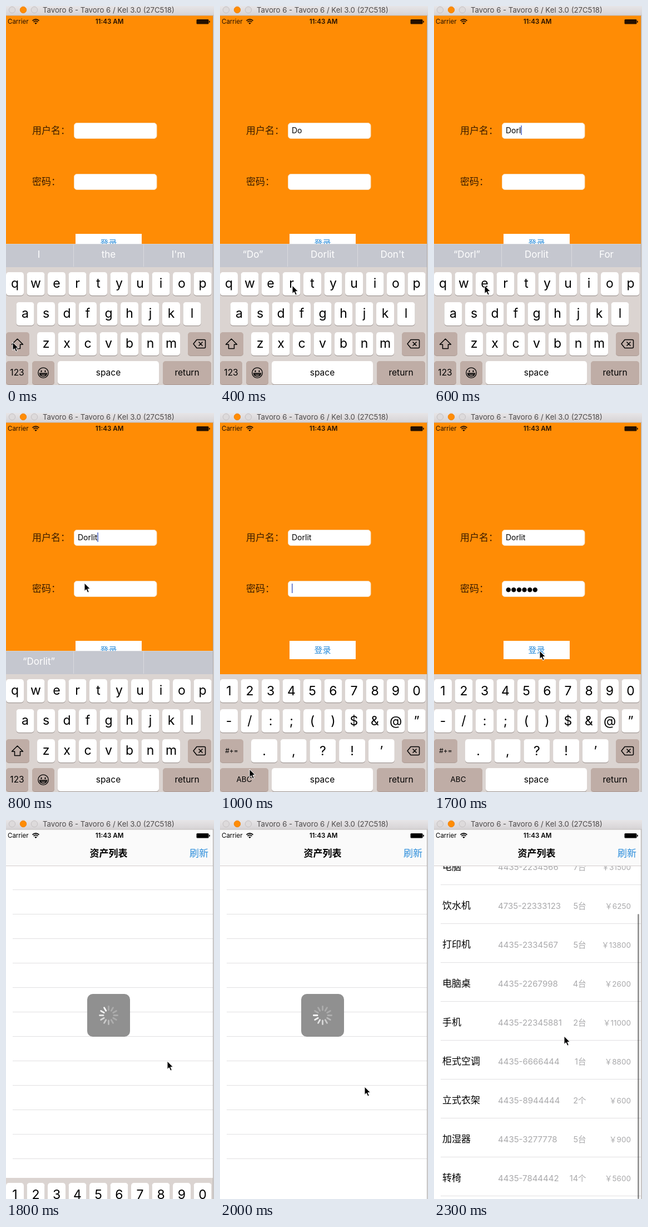
An HTML page for the animation above (2400 ms loop, 374 by 682 pixels).

```html
<!DOCTYPE html>
<html lang="zh-CN">
<head>
<meta charset="utf-8">
<style>
  html, body { margin: 0; width: 100%; height: 100%; overflow: hidden; background: #fff; }
  svg { display: block; width: 374px; height: 682px; }
  text { font-family: Inter, "Noto Sans CJK SC", "Noto Sans CJK", sans-serif; white-space: pre; }
  #dots { font-family: "DejaVu Sans", sans-serif; font-size: 11px; }
</style>
</head>
<body>
<svg id="stage" viewBox="0 0 374 682" xmlns="http://www.w3.org/2000/svg"></svg>
<script>
const STEP = 100, STEPS = 24;
const USER = "Dorlit", PIN = "123456";
const BLUE = "#2b8ddb", LINE = "#e1e0e2", FAINT = "#a9a9ab";

const rect = (x, y, w, h, fill, rx = 0, extra = "") =>
  `<rect x="${x}" y="${y}" width="${w}" height="${h}" fill="${fill}" rx="${rx}" ${extra}/>`;
const text = (x, y, size, str, fill = "#000", anchor = "start", extra = "") =>
  `<text x="${x}" y="${y}" font-size="${size}" fill="${fill}" text-anchor="${anchor}" ${extra}>${str.replace(/&/g, "&amp;")}</text>`;
const range = n => [...Array(n).keys()];

// Keyboard
const key = (x, y, w, label, size = 23, dark = false) =>
  rect(x, y + 1, w, 42, dark ? "#ac9b95" : "#948b88", 5) +
  rect(x, y, w, 42, dark ? "#bfada6" : "#fff", 5) +
  text(x + w / 2, y + 21 + size * (/[a-z]/.test(label) && size > 20 ? 0.29 : 0.33), size, label, "#000", "middle");
const keyRow = (chars, x, y, w = 32, step = 37.5) =>
  [...chars].map((c, i) => key(x + i * step, y, w, c)).join("");

const deleteKey = key(327, 587, 42, "", 16, true) +
  `<path d="M337 608l6-7.5h13.5q2 0 2 2v11q0 2-2 2H343zM346.5 604.5l7 7m0-7l-7 7" fill="none" stroke="#000" stroke-width="1.5" stroke-linejoin="round"/>`;
const spaceAndReturn = key(93, 639, 182, "space", 15.5) + key(282, 639, 87, "return", 15.5, true);
const shiftIcon = `<path d="M20.5 599l10 10h-5v7.5h-10V609h-5z" fill="none" stroke="#000" stroke-width="1.5" stroke-linejoin="round"/>`;
const smiley = `<g fill="none" stroke="#000" stroke-width="1.3"><circle cx="67" cy="660" r="9.2"/>
  <path d="M60.5 661h13q-1 5-6.500 5t-6.500-5zM61 663h12"/>
  <path d="M63.5 656.5v1.500M70.5 656.5v1.500" stroke-width="2" stroke-linecap="round"/></g>`;

const letters = keyRow("qwertyuiop", 0, 479) + keyRow("asdfghjkl", 18.5, 533) +
  key(0, 587, 42, "", 16, true) + shiftIcon + keyRow("zxcvbnm", 56, 587) + deleteKey +
  key(0, 639, 40, "123", 15.5, true) + key(47, 639, 40, "", 16, true) + smiley + spaceAndReturn;
const numbers = keyRow("1234567890", 0, 479) + keyRow("-/:;()$&@”", 0, 533) +
  key(0, 587, 42, "#+=", 12, true) + keyRow(".,?!’", 56, 587, 47, 52.7) + deleteKey +
  key(0, 639, 87, "ABC", 13.5, true) + spaceAndReturn;

const suggestionBar = rect(0, 428, 372, 42, "#c5c7cf") + rect(0, 428, 372, 1, "#d3d4d9") +
  [121, 247].map(x => rect(x, 429, 1, 40, "#d9d9dd")).join("") +
  [59, 184.5, 310].map(x => text(x, 452.5, 17, "", "#fff", "middle", 'class="suggestion"')).join("");

// Screens
const field = (y, label) => text(47, y + 19.5, 17, label, "#3a1c00") +
  rect(122.5, y + 0.5, 148.5, 28, "#fff", 5, 'stroke="#f6dcbb"');
const login = rect(0, 17, 372, 665, "#ff8c05") + field(210, "用户名：") + field(302, "密码：") +
  text(129, 228.5, 14, "", "#000", "start", 'id="user"') +
  `<text id="pin" x="129" y="321" font-size="14"><tspan id="dots"></tspan><tspan id="digit"></tspan></text>` +
  rect(0, 0, 1.5, 17, "#4b63c4", 0, 'id="caret"') +
  rect(125, 410, 119, 33, "#fff") + text(184.5, 432, 15, "登录", BLUE, "middle");

const items = [
  ["投影仪", "4435-2234111", "3台", 9800],
  ["电脑", "4435-2234566", "7台", 31500],
  ["饮水机", "4735-22333123", "5台", 6250],
  ["打印机", "4435-2334567", "5台", 13800],
  ["电脑桌", "4435-2267998", "4台", 2600],
  ["手机", "4435-22345881", "2台", 11000],
  ["柜式空调", "4435-6666444", "1台", 8800],
  ["立式衣架", "4435-8944444", "2个", 600],
  ["加湿器", "4435-3277778", "5台", 900],
  ["转椅", "4435-7844442", "14个", 5600]
];
const itemRow = ([name, code, count, price], i) => {
  const y = 82 + i * 70;
  return text(15, y + 44, 17, name) + text(115, y + 43.5, 15, code, FAINT) +
    text(273.5, y + 43.5, 14.5, count, FAINT, "end") +
    text(354, y + 44, 13.5, "￥" + price, FAINT, "end") + rect(12, y + 70, 360, 1, LINE);
};
const emptyRows = range(12).map(i => rect(12, 125 + i * 44, 360, 1, LINE)).join("");
const spokes = range(12).map(i =>
  `<path d="M0-9.5V-16" transform="rotate(${i * 30 - 30})" stroke="#fff" stroke-width="2.8" stroke-linecap="round" opacity="${Math.max(0.25, 1 - (12 - i) % 12 * 0.12)}"/>`).join("");
const hud = rect(146, 313, 77, 77, "#8c8c8c", 10, 'opacity=".96"') +
  `<g transform="translate(184.5 351.5)"><g id="spinner">${spokes}</g></g>`;
const navBar = rect(0, 17, 372, 65, "#fafafa") + rect(0, 82, 372, 1, "#d3cdcd") +
  text(184.5, 66, 17, "资产列表", "#000", "middle", 'font-weight="600"') +
  text(364, 66, 17, "刷新", BLUE, "end");
const list = rect(0, 17, 372, 665, "#fff") + `<g id="empty">${emptyRows}</g>` +
  `<g id="items">${items.map(itemRow).join("")}</g>` + navBar +
  `<g id="hud">${hud}</g>` + rect(366, 169, 3, 513, "#000", 1.5, 'id="thumb" opacity=".4"');

// Window chrome and status bar
const statusBar = `<g id="status">` + text(3, 32, 11.5, "Carrier", "currentColor") +
  text(186, 32, 11.6, "11:43 AM", "currentColor", "middle", 'font-weight="600"') +
  `<g fill="none" stroke="currentColor" stroke-width="1.7"><path d="M47.5 26.5q6-5 12 0M49.5 28.8q4-3.3 8 0"/></g>
  <path d="M51.2 30.5q2.3-1.7 4.6 0l-2.3 2.5z" fill="currentColor"/>
  <rect x="342.5" y="24" width="22" height="8.5" rx="1.5" fill="currentColor"/>
  <rect x="365" y="26.5" width="1.7" height="3.5" rx=".8" fill="currentColor"/></g>`;
const titleBar = `<defs><linearGradient id="chrome" x2="0" y2="1"><stop stop-color="#e7e5e7"/><stop offset="1" stop-color="#d6d3d5"/></linearGradient></defs>` +
  rect(0, 0, 374, 17, "url(#chrome)") + rect(0, 16.5, 374, 1, "#c2bdbd") +
  [11, 31, 51].map((x, i) => `<circle cx="${x}" cy="7" r="5.7" fill="${i === 1 ? "#ff8c05" : "#dddadb"}" stroke="${i === 1 ? "#ee8410" : "#c5c1c3"}"/>`).join("") +
  text(66, 12, 13.2, "Tavoro 6 - Tavoro 6 / Kel 3.0 (27C518)", "#4c4a4b");
const pointer = `<path id="pointer" d="M0 0V14.5L3.3 11.5L5.8 17.2L8.3 16.1L5.9 10.6H10.4Z" fill="#000" stroke="#fff"/>`;

document.getElementById("stage").innerHTML = `<g id="login">${login}</g><g id="list">${list}</g>
  <g id="keyboard"><g id="bar">${suggestionBar}</g>${rect(0, 470, 372, 212, "#dbd4d1")}
  <g id="letters">${letters}</g><g id="numbers">${numbers}</g></g>
  ${statusBar}${titleBar}${rect(372, 17, 1, 665, "#aaa7a7")}${rect(373, 17, 1, 665, "#e4e2e2")}${pointer}`;

const $ = id => document.getElementById(id);
const show = (id, on) => $(id).setAttribute("display", on ? "inline" : "none");
const move = (id, x, y) => $(id).setAttribute("transform", `translate(${x} ${y})`);
const suggestionTexts = [...document.querySelectorAll(".suggestion")];

const userLengths = [0, 0, 1, 1, 2, 3, 4, 6];
const pinLengths = [1, 2, 4, 5, 6];
const pointerPath = [
  [12, 605], [34, 555], [150, 530], [278, 503], [130, 503], [146, 552], [91, 503], [278, 503],
  [141, 306], [24, 655], [53, 641], [15, 503], [60, 500], [125, 500], [191, 498], [200, 500],
  [192, 460], [190, 428], [290, 434], [290, 440], [260, 480], [236, 496], [235, 442], [234, 389]
];

function suggestions(word) {
  if (!word) return ["I", "the", "I'm"];
  const quoted = `“${word}”`;
  if (word === USER) return [quoted, "", ""];
  return [quoted, USER, word.length > 2 ? "For" : "Don't"];
}

function render(time) {
  const k = Math.floor(time / STEP) % STEPS;
  const onLogin = k < 18, onUser = k < 9, loaded = k >= 21;

  // Typed text; the newest password digit stays readable for a moment
  const word = USER.slice(0, userLengths[Math.min(k, 7)]);
  const digits = k < 11 ? 0 : pinLengths[Math.min(k - 11, 4)];
  const masked = k > 15 ? digits : Math.max(0, digits - 1);
  $("user").textContent = word;
  $("dots").textContent = "●".repeat(masked);
  $("digit").textContent = PIN.slice(masked, digits);

  show("login", onLogin);
  show("list", !onLogin);
  $("status").style.color = onLogin ? "#241000" : "#000";

  show("caret", k > 5 && k % 2 === 0);
  if (onLogin) {
    const active = $(onUser ? "user" : "pin");
    move("caret", 129 + active.getComputedTextLength(), onUser ? 215 : 307);
  }

  show("keyboard", k < 19);
  show("bar", onUser);
  show("letters", k < 10);
  show("numbers", k >= 10);
  move("keyboard", 0, k === 18 ? 174 : 0);
  suggestions(word).forEach((s, i) => suggestionTexts[i].textContent = s);

  show("empty", !loaded);
  show("hud", !loaded);
  show("items", loaded);
  show("thumb", k > 21);
  const scroll = Math.max(0, k - 21) * 53;
  move("items", 0, -scroll);
  $("thumb").setAttribute("y", 82 + scroll * 0.82);
  $("spinner").setAttribute("transform", `rotate(${(k - 18) * 150})`);

  move("pointer", ...pointerPath[k]);
}

const start = performance.now();
function tick() {
  render(performance.now() - start);
  requestAnimationFrame(tick);
}
tick();
</script>
</body>
</html>
```
